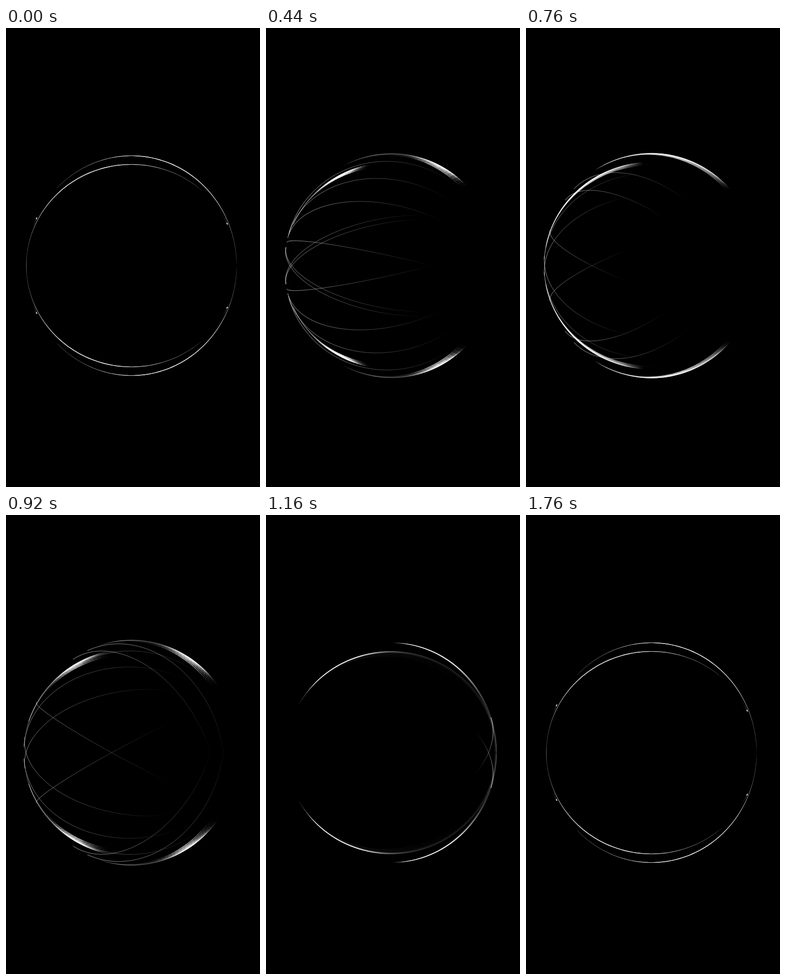
Animation, 500 px wide and 900 px high, one loop 1800 ms. Source, as an HTML page with a canvas:

```html
<!DOCTYPE html>
<html lang="en">
<head>
<meta charset="utf-8">
<title>Orbiting strands</title>
<style>
html, body { margin: 0; width: 100%; height: 100%; background: #000; overflow: hidden; }
canvas { display: block; }
</style>
</head>
<body>
<canvas id="stage" width="500" height="900"></canvas>
<script>
const ctx = document.getElementById('stage').getContext('2d');
const LOOP = 1800, CX = 247, CY = 466, RING = 207, SPLIT = .041, DEG = Math.PI / 180, FAN_COUNT = 9;

// Angles in degrees.
// tip, turn: direction of a bundle's tip before the flip and its change during it
// bend: 0 = tip turns evenly, 1 = tip leads the flip
// cut, peak, width, fan, glow: the bundles at both ends of the flip
// lead, swing: like tip and turn, for the single strands on their way
// reach, light, flips: length, brightness and flip angles of the single strands
const REST = { tip: 135, turn: 41, bend: 0, radius: RING, cut: 140, peak: 69, width: 32, fan: 0, glow: .25,
  lead: 135, swing: 41, reach: 60, light: 0, flips: [5, 8, 10, 14, 18, 22] };
const SETTLED = [160, 163, 166, 169, 172, 175];
const KEYS = [
  [0, REST],
  [440, { tip: 100, turn: 104, bend: 1, radius: 211, cut: 54, peak: 38, width: 11, fan: 18, glow: .9,
    lead: 161, swing: 14, reach: 112, light: .7, flips: [22, 40, 57, 85, 114, 117] }],
  [600, { tip: 135, turn: 52, bend: 0, radius: 211, cut: 84, peak: 45, width: 45, fan: 9, glow: .42,
    lead: 135, swing: 52, reach: 46, light: .75, flips: [64, 82, 110, 140, 160, 168] }],
  [920, { tip: 96, turn: 104, bend: 0, radius: 212, cut: 60, peak: 39, width: 10, fan: 20, glow: .9,
    lead: 93, swing: 112, reach: 116, light: .6, flips: [34, 48, 95, 126, 145, 168] }],
  [1160, { tip: 80, turn: 145, bend: 0, radius: RING, cut: 140, peak: 17, width: 20, fan: 11, glow: .4,
    lead: 80, swing: 145, reach: 110, light: .15, flips: SETTLED }],
  [1320, { ...REST, flips: SETTLED }],
  [LOOP, REST]
];

const clamp = x => Math.min(1, Math.max(0, x));
const smooth = x => x * x * (3 - 2 * x);
const mix = (a, b, u) => Array.isArray(a) ? a.map((v, i) => mix(v, b[i], u)) : a + (b - a) * u;
const bell = x => Math.exp(-x * x);

function poseAt(t) {
  const i = KEYS.findIndex(key => key[0] > t);
  const [t0, a] = KEYS[i - 1], [t1, b] = KEYS[i];
  const u = smooth((t - t0) / (t1 - t0)), pose = {};
  for (const name in a) pose[name] = mix(a[name], b[name], u);
  return pose;
}

// A path and its mirror image, shaded along its length.
function trace(point, length, step, shade, lineWidth) {
  ctx.lineWidth = lineWidth;
  let [x0, y0] = point(0);
  for (let a = 0; a < length; a += step) {
    const end = Math.min(length, a + step), [x1, y1] = point(end);
    const alpha = clamp(shade((a + end) / 2));
    if (alpha > .012) {
      ctx.globalAlpha = alpha;
      ctx.beginPath();
      for (const side of [-1, 1]) {
        ctx.moveTo(CX + x0, CY + side * y0);
        ctx.lineTo(CX + x1, CY + side * y1);
      }
      ctx.stroke();
    }
    x0 = x1;
    y0 = y1;
  }
}

// An arc hinged at its tip and flipped out of the picture plane.
function strand(radius, tip, flip, length, shade, lineWidth) {
  const c = Math.cos(tip * DEG), s = Math.sin(tip * DEG), f = Math.cos(flip * DEG);
  const tall = radius * (1 + SPLIT * f);
  trace(angle => {
    const along = Math.cos(angle * DEG), across = Math.sin(angle * DEG) * f;
    return [radius * (c * along + s * across), tall * (s * along - c * across)];
  }, length, 2, shade, lineWidth);
}

function drawPose(p) {
  const tipAt = flip => p.tip + p.turn * mix(flip / 180, Math.sin(flip / 2 * DEG), p.bend);

  for (const end of [0, 180]) {
    for (let j = 0; j < FAN_COUNT; j++) {
      const flip = Math.abs(end - p.fan * j / (FAN_COUNT - 1));
      const tip = tipAt(flip), shift = Math.abs(tip - tipAt(end)), length = p.cut + shift;
      strand(p.radius, tip, flip, length,
        a => p.glow * (bell((a - p.peak - shift) / p.width) + .09) * clamp((length - a) / 10), 1.15);
    }
  }
  if (p.light > .01) {
    for (const flip of p.flips) {
      strand(p.radius, p.lead + p.swing * flip / 180, flip, p.reach,
        a => p.light * (1 - a / p.reach), 1);
    }
  }
}

// A bright end with a fading tail, sliding along a resting ring.
function slidingTip(angle, length, tall, light) {
  const at = a => [RING * Math.cos((angle + a) * DEG), RING * tall * Math.sin((angle + a) * DEG)];
  trace(at, 1, 1, () => light, 1.8);
  trace(at, length, 1, a => light * .45 * (1 - a / length), 1);
}

function draw(t) {
  ctx.globalAlpha = 1;
  ctx.fillStyle = '#000';
  ctx.fillRect(0, 0, 500, 900);
  ctx.strokeStyle = '#fff';
  drawPose(poseAt(t));

  const hook = bell((t - 1160) / 70);
  strand(RING, 19, 52, 46, a => .9 * hook * (1 - a / 46), 1);

  const starting = t < 200;
  const light = starting ? 1 - clamp(t / 120) : clamp((t - 1220) / 100);
  const u = starting ? 1 : clamp((t - 1320) / 440);
  slidingTip(mix(163, 154, u), mix(34, 6, u), 1 + SPLIT, light * mix(.6, .9, u));
  slidingTip(mix(30.5, 24, u), mix(50, 6, u), 1 - SPLIT, light * mix(.7, .9, u));
}

function frame() {
  draw(performance.now() % LOOP);
  requestAnimationFrame(frame);
}
frame();
</script>
</body>
</html>
```
